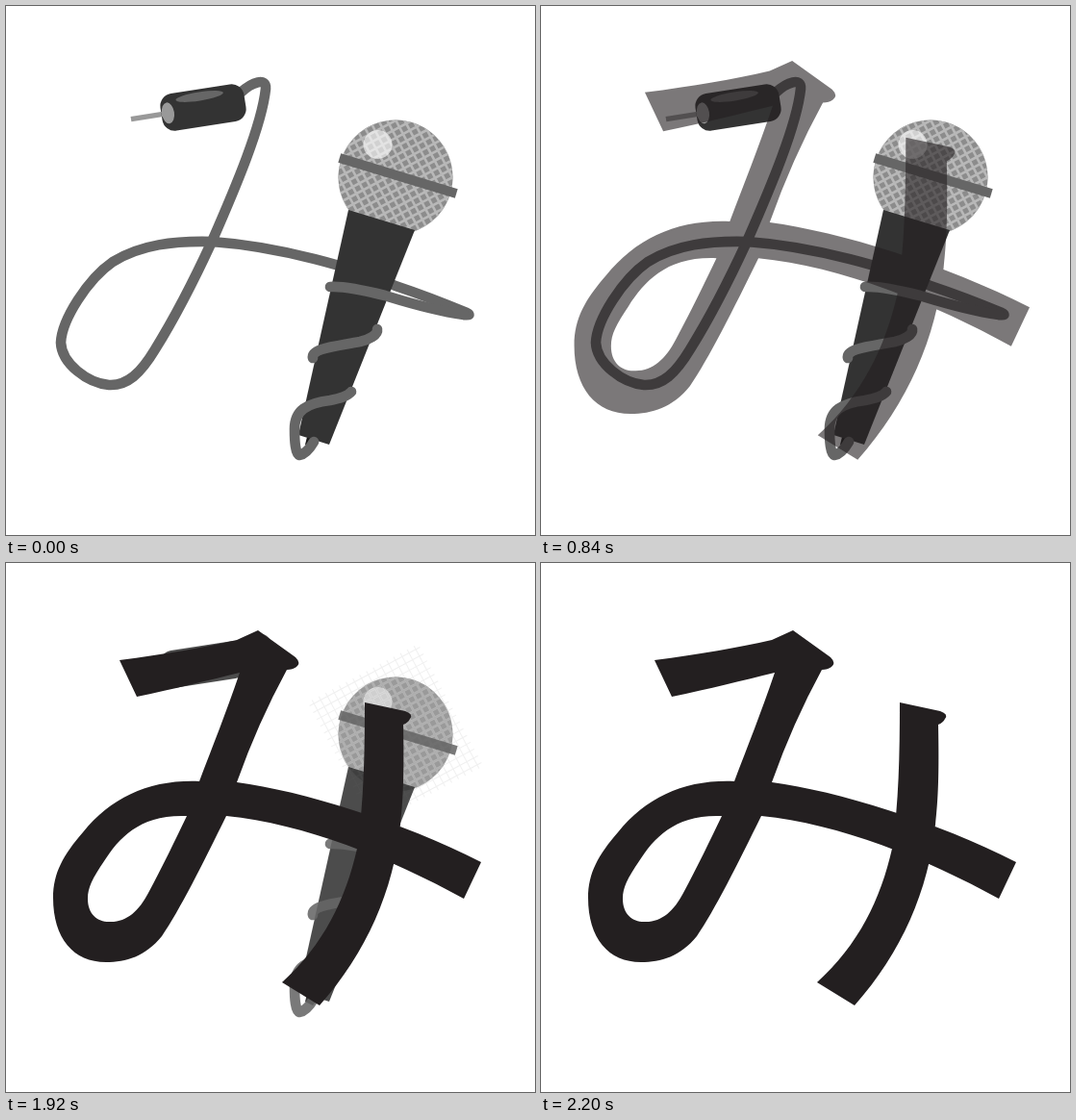
Animation of 550 by 550 pixels, one loop 3 s. Source, as an HTML page with a canvas:

```html
<!DOCTYPE html>
<html lang="ja">
<head>
<meta charset="utf-8">
<title>Microphone to kana</title>
<style>
  html, body { margin: 0; width: 100%; height: 100%; overflow: hidden; background: #fff; }
  canvas { display: block; width: 550px; height: 550px; }
</style>
</head>
<body>
<canvas id="stage" width="550" height="550"></canvas>
<script>
const ctx = document.getElementById('stage').getContext('2d');
const LOOP = 3000, STEP = 40, MID = 275;
const GREY = '#666', DARK = '#333', INK = '#231f20';
const BALL = { x: 405, y: 178, r: 59.5 };
const SHINE = { x: 386.5, y: 144, r: 15 };

const kana = new Path2D(
  'M118 101C165 95 205 88 240 80L262 70L301 98Q307 104 302 108Q298 111 292 111Q262 166 240 228' +
  'C308 237 412 269 494 311L476 349C400 307 310 271 229 263C205 312 180 362 162 388' +
  'C145 409 125 415 104 415C70 415 49 390 49 348C49 322 60 303 80 280' +
  'C110 243 150 225 201 227C215 190 228 158 243 114C210 122 175 131 136 139Z' +
  'M188 263C140 261 118 285 102 310C90 328 85 337 85 349C85 365 95 373 107 373' +
  'C125 374 138 362 148 343C163 315 175 290 188 263Z' +
  'M373 145L415 154Q424 157 420 162Q418 166 413 168C414 220 413 245 410 272' +
  'C403 340 375 405 326 460L287 436C330 397 353 350 365 297C372 250 373 200 373 145Z');

const cable = new Path2D(
  'M244 90C256 79 271 74 270 86C266 124 239 188 214 245C196 284 178 320 155 357' +
  'C140 382 126 395 107 394C85 392 58 372 57 350C58 326 85 284 111 266' +
  'C140 248 175 244 214 245C285 250 365 273 405 291C435 301 460 311 479 319Q485 322 476 321');

const wraps = new Path2D(
  'M476 321C442 316 417 308 394 301C370 295 350 291 337 292' +
  'M386 336C387 342 377 347 368 349C342 354 317 356 319 366' +
  'M359 401C355 406 347 408 337 410C313 413 300 420 300 440C300 453 301 466 305 467C311 466 316 460 320 453');

const handle = new Path2D('M356 212L425 233L336 456L304 446Z');
const stub = new Path2D('M313 448L325 452L319 460L311 456Z');

const clamp = v => Math.max(0, Math.min(1, v));

// Progress that advances in discrete steps, the first one already visible at its start
const stepped = (t, start, count) => clamp((Math.floor((t - start) / STEP) + 1) / count);

function disc({ x, y, r }, color) {
  ctx.fillStyle = color;
  ctx.beginPath();
  ctx.arc(x, y, r, 0, 7);
  ctx.fill();
}

function clipDisc({ x, y, r }) {
  ctx.beginPath();
  ctx.arc(x, y, r, 0, 7);
  ctx.clip();
}

function oval(x, y, rx, ry, color) {
  ctx.fillStyle = color;
  ctx.beginPath();
  ctx.ellipse(x, y, rx, ry, 0, 0, 7);
  ctx.fill();
}

function fill(path, color) {
  ctx.fillStyle = color;
  ctx.fill(path);
}

function placed(x, y, degrees, draw) {
  ctx.save();
  ctx.translate(x, y);
  ctx.rotate(degrees * Math.PI / 180);
  draw();
  ctx.restore();
}

function strokeCable(path) {
  ctx.strokeStyle = GREY;
  ctx.lineWidth = 10.6;
  ctx.lineCap = ctx.lineJoin = 'round';
  ctx.stroke(path);
}

function mesh(color, width, gap = 8) {
  placed(BALL.x, BALL.y, -28, () => {
    ctx.beginPath();
    for (let x = -60; x <= 60; x += gap) { ctx.moveTo(x, -72); ctx.lineTo(x, 72); }
    for (let y = -68; y <= 68; y += gap) { ctx.moveTo(-65, y); ctx.lineTo(65, y); }
    ctx.strokeStyle = color;
    ctx.lineWidth = width;
    ctx.lineCap = 'butt';
    ctx.stroke();
  });
}

function drawPlug() {
  placed(205, 105.5, -9, () => {
    ctx.fillStyle = '#999';
    ctx.fillRect(-76, -2.5, 40, 5.5);
    ctx.fillStyle = DARK;
    ctx.beginPath();
    ctx.roundRect(-44, -19.5, 88, 39, 13);
    ctx.fill();
    oval(-2, -12, 25, 4.5, GREY);
    oval(-37, 0, 6.5, 11, '#999');
    ctx.fillStyle = '#999';
    ctx.fillRect(-44, -2.5, 10, 5.5);
  });
}

function drawMic(alpha) {
  ctx.save();
  ctx.globalAlpha = alpha;
  strokeCable(cable);
  drawPlug();

  disc(BALL, '#8c8c8c');
  ctx.save();
  clipDisc(BALL);
  mesh('#b8b8b8', 2.6);
  ctx.restore();
  placed(407.5, 176.5, 17, () => {
    ctx.fillStyle = GREY;
    ctx.fillRect(-63.5, -5, 127, 10);
  });
  disc(SHINE, 'rgba(255,255,255,.6)');

  fill(stub, '#1a1a1a');
  fill(handle, DARK);
  strokeCable(wraps);
  ctx.restore();
}

// While fading, the mesh spills past the ball
function drawSpill(fade) {
  mesh(`rgba(110,110,110,${0.08 + 0.2 * fade * (1 - fade)})`, 1);
  if (fade < 0.6) return;
  ctx.save();
  clipDisc(SHINE);
  mesh('#111', 1.2, 5);
  ctx.restore();
}

function drawKana(p) {
  const scale = 1 + 0.172 * (1 - p) ** 1.08;
  ctx.save();
  ctx.translate(MID, MID);
  ctx.scale(scale, scale);
  ctx.translate(-MID, -MID);
  ctx.globalAlpha = p;
  fill(kana, INK);
  ctx.restore();
}

function render(t) {
  ctx.fillStyle = '#fff';
  ctx.fillRect(0, 0, 550, 550);
  const enter = stepped(t, 640, 10);
  const fade = stepped(t, 1920, 8);
  if (fade < 1) drawMic(1 - fade);
  if (fade > 0 && fade < 1) drawSpill(fade);
  if (enter > 0) drawKana(enter);
}

const start = performance.now();
function tick() {
  render((performance.now() - start) % LOOP);
  requestAnimationFrame(tick);
}
tick();
</script>
</body>
</html>
```
